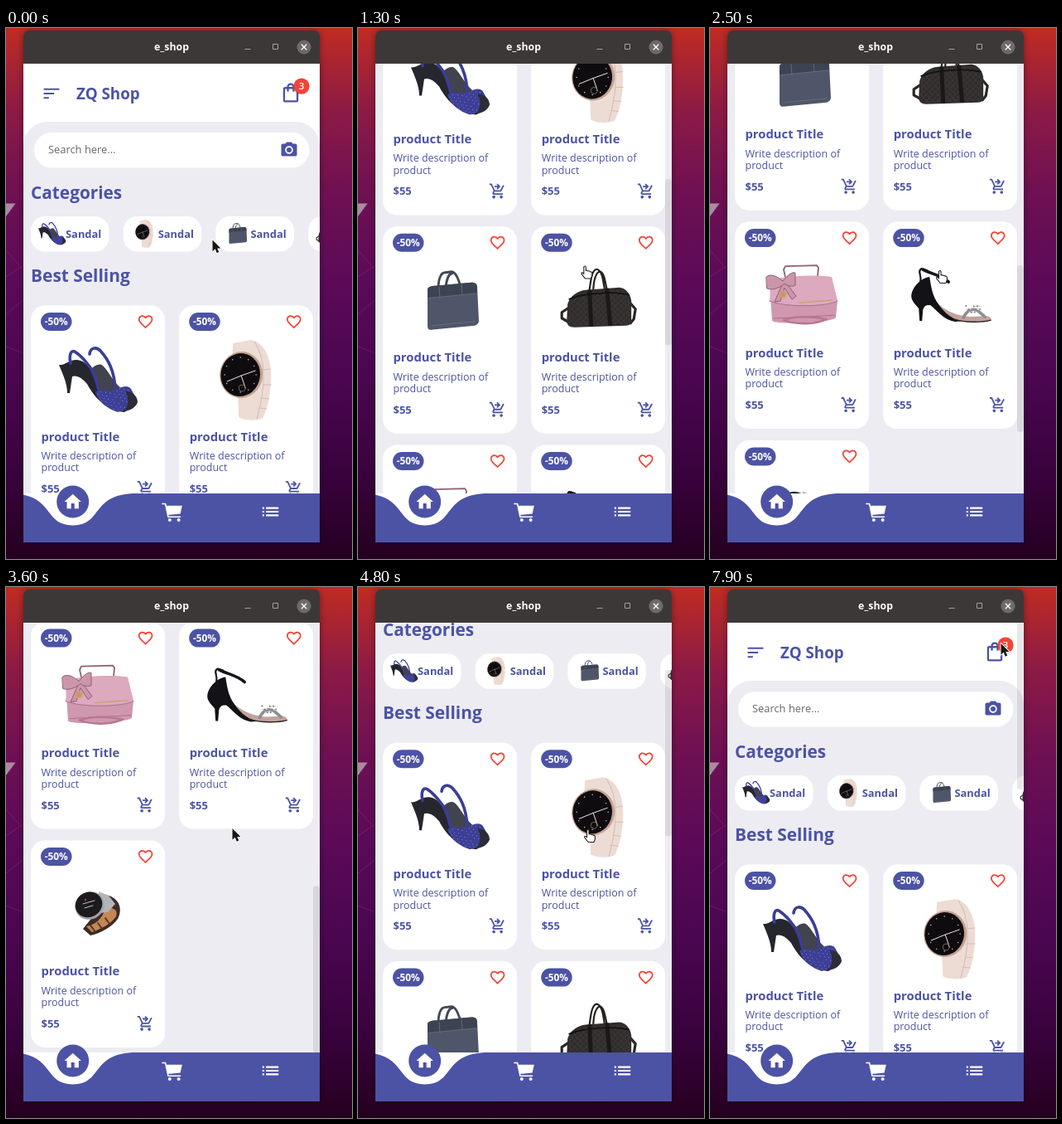
These frames come from a looping animation (418 px wide and 640 px high, 8000 ms). An HTML page with a canvas:

```html
<!DOCTYPE html>
<html lang="en">
<head>
<meta charset="utf-8">
<title>e_shop</title>
<style>
html, body { margin: 0; width: 418px; height: 640px; overflow: hidden; background: #3c0440; }
canvas { display: block; width: 418px; height: 640px; }
</style>
</head>
<body>
<canvas id="stage"></canvas>
<script>
const LOOP = 8000, W = 418, H = 640;
const BLUE = '#4c53a5', GREY = '#edecf2', RED = '#f44336';
const TICK = 44.82, MAX_SCROLL = 819, ROW = 263.3, COL = 179.2;
const VIEW = { x: 21, y: 43, w: 358, h: 518 };
const FONT = '"Ubuntu", "Open Sans", "Noto Sans", sans-serif';

const canvas = document.getElementById('stage');
const ratio = Math.max(1, window.devicePixelRatio || 1);
canvas.width = W * ratio;
canvas.height = H * ratio;
const ctx = canvas.getContext('2d');

const ICON = {
  sort: 'M3 18h6v-2H3v2zM3 6v2h18V6H3zm0 7h12v-2H3v2z',
  bag: 'M18 6h-2c0-2.21-1.79-4-4-4S8 3.79 8 6H6c-1.1 0-2 .9-2 2v12c0 1.1.9 2 2 2h12c1.1 0 2-.9 2-2V8c0-1.1-.9-2-2-2zm-6-2c1.1 0 2 .9 2 2h-4c0-1.1.9-2 2-2zm6 16H6V8h2v2c0 .55.45 1 1 1s1-.45 1-1V8h4v2c0 .55.45 1 1 1s1-.45 1-1V8h2v12z',
  camera: 'M9 2L7.17 4H4c-1.1 0-2 .9-2 2v12c0 1.1.9 2 2 2h16c1.1 0 2-.9 2-2V6c0-1.1-.9-2-2-2h-3.17L15 2H9zm3 15c-2.76 0-5-2.24-5-5s2.24-5 5-5 5 2.24 5 5-2.24 5-5 5zM12 8.8a3.2 3.2 0 1 0 0 6.4a3.2 3.2 0 1 0 0-6.4z',
  heart: 'M16.5 3c-1.74 0-3.41.81-4.5 2.09C10.91 3.81 9.24 3 7.5 3 4.42 3 2 5.42 2 8.5c0 3.78 3.4 6.86 8.55 11.54L12 21.35l1.45-1.32C18.6 15.36 22 12.28 22 8.5 22 5.42 19.58 3 16.5 3zm-4.4 15.55l-.1.1-.1-.1C7.14 14.24 4 11.39 4 8.5 4 6.5 5.5 5 7.5 5c1.54 0 3.04.99 3.57 2.36h1.87C13.46 5.99 14.96 5 16.5 5c2 0 3.5 1.5 3.5 3.5 0 2.89-3.14 5.74-7.9 10.05z',
  checkout: 'M7 18c-1.1 0-1.99.9-1.99 2S5.9 22 7 22s2-.9 2-2-.9-2-2-2zM17 18c-1.1 0-1.99.9-1.99 2s.89 2 1.99 2 2-.9 2-2-.9-2-2-2zM8.1 13h7.45c.75 0 1.41-.41 1.75-1.03L21 4.96 19.25 4l-3.7 7H8.53L4.27 2H1v2h2l3.6 7.59-1.35 2.44C4.52 15.37 5.48 17 7 17h12v-2H7l1.1-2zM12 2l4 4-4 4-1.41-1.41L12.17 7H8V5h4.17l-1.59-1.59L12 2z',
  home: 'M10 20v-6h4v6h5v-8h3L12 3 2 12h3v8z',
  list: 'M3 13h2v-2H3v2zm0 4h2v-2H3v2zm0-8h2V7H3v2zm4 4h14v-2H7v2zm0 4h14v-2H7v2zM7 7v2h14V7H7z'
};
for (const k in ICON) ICON[k] = new Path2D(ICON[k]);

function icon(name, cx, cy, scale, color) {
  ctx.save();
  ctx.translate(cx, cy);
  ctx.scale(scale, scale);
  ctx.translate(-12, -12);
  ctx.fillStyle = color;
  ctx.fill(ICON[name], 'evenodd');
  ctx.restore();
}

function box(x, y, w, h, r, color) {
  ctx.beginPath();
  ctx.roundRect(x, y, w, h, r);
  ctx.fillStyle = color;
  ctx.fill();
}

function disc(x, y, r, color, ry = r, turn = 0) {
  ctx.beginPath();
  ctx.ellipse(x, y, r, ry, turn, 0, Math.PI * 2);
  ctx.fillStyle = color;
  ctx.fill();
}

function text(str, x, y, size, color, weight = 700, align = 'left') {
  ctx.font = `${weight} ${size}px ${FONT}`;
  ctx.textAlign = align;
  ctx.fillStyle = color;
  ctx.fillText(str, x, y);
}

function shape(color, d) {
  ctx.fillStyle = color;
  ctx.fill(new Path2D(d));
}

function line(color, width, d) {
  ctx.strokeStyle = color;
  ctx.lineWidth = width;
  ctx.stroke(new Path2D(d));
}

// Product pictures, each drawn around its own centre
function sandal() {
  shape('#25262e', 'M-47 -20C-40 -19 -34 -27 -25 -26C-15 -25 -9 -16 -5 -8C4 8 20 22 46 28L32 37C12 35 -3 22 -13 3C-19 -4 -25 -8 -31 -6L-34 14L-37 14C-37 2 -43 -10 -47 -20Z');
  shape('#41434f', 'M-9 -14C-4 -20 2 -22 6 -19C14 -12 18 2 32 11L11 21C1 10 -5 -2 -9 -14Z');
  line('#3b3d96', 3.6, 'M-33 -22C-35 -31 -33 -38 -28 -36C-20 -31 -10 -20 -4 -8L2 14M-10 -33C-9 -41 -2 -42 3 -37C12 -27 20 -14 21 10');
  const vamp = new Path2D('M-3 13C8 7 14 14 22 10C30 6 36 4 40 9L45 18C46 25 42 31 37 33L24 37C12 33 2 26 -3 13Z');
  ctx.fillStyle = '#3d3f97';
  ctx.fill(vamp);
  ctx.save();
  ctx.clip(vamp);
  for (let i = 0; i < 70; i++) disc(-4 + (i * 7.3) % 49, 8 + (i * 4.7) % 29, 0.5, '#9da0d8');
  ctx.restore();
  shape('#2c2d36', 'M33 12C42 12 48 18 48 25C46 31 40 35 31 36C38 29 38 20 33 12Z');
}

function watch() {
  shape('#ecdcd4', 'M-17 -30L-16 -46L6 -50C22 -47 30 -28 30 -8C30 12 27 30 20 44C10 48 -3 47 -9 43L-10 16Z');
  line('#d3bdb5', 1.1, 'M10 -48C18 -36 21 -22 21 -6C21 14 17 30 13 45M21 -14L29 -15M21 4L30 4M18 20L27 21M15 32L24 33');
  disc(-6, -8, 26, '#c4a193', 28, 0.15);
  disc(-7, -8, 23.8, '#0e0c0f', 26, 0.15);
  for (let i = 0; i < 12; i++) {
    const a = i * Math.PI / 6;
    disc(-7 + 19 * Math.cos(a), -8 + 21 * Math.sin(a), 0.8, '#c9b8b0');
  }
  line('#eee6e2', 1, 'M-23 0L-6 -7L11 -13M-6 -7L-1 8');
  ctx.beginPath();
  ctx.arc(-5, 8, 4, 0, 7);
  ctx.strokeStyle = '#8f786e';
  ctx.lineWidth = 0.8;
  ctx.stroke();
}

function briefcase() {
  line('#414757', 2.8, 'M-14 -16C-14 -28 -11 -36 -6 -36L2 -37C8 -36 10 -28 14 -17M-5 -18C-4 -28 -1 -35 3 -35');
  shape('#50566a', 'M-27 -16C-26 -19 -22 -20 -18 -20L26 -24C31 -24 33 -22 33 -18L35 22C35 25 33 27 30 28L-23 33C-26 33 -27 31 -27 28Z');
  shape('#3d4353', 'M-27 -16C-26 -19 -22 -20 -18 -20L26 -24C31 -24 33 -22 33 -18L33 -11L-27 -5Z');
  line('#6a7184', 0.8, 'M-27 -5L33 -11M-22 28L30 23M-13 -18L-12 -5M14 -21L15 -9');
}

function duffel() {
  line('#252220', 2.2, 'M-11 -12C-9 -26 -8 -39 -2 -40C5 -39 6 -26 8 -14M-6 -12C-6 -28 -2 -38 3 -37C8 -34 8 -24 11 -14');
  line('#2b2726', 3.2, 'M-35 6L-44 12L-44 19L-37 23M38 0L45 8L43 20L39 25');
  shape('#302d2c', 'M-37 2C-34 -8 -25 -14 -15 -15L26 -18C34 -17 39 -10 40 -2L40 24C39 27 36 28 33 28L-29 30C-35 30 -38 27 -38 22Z');
  ctx.save();
  ctx.clip(new Path2D('M-36 0L-16 -12L30 -15L39 -2L38 27L-36 29Z'));
  for (let x = -70; x < 60; x += 7) line('#433e3b', 0.8, `M${x} -16l48 48M${x + 48} -16l-48 48`);
  ctx.restore();
  shape('#1b1918', 'M-13 -15L-8 -15L-6 29L-11 29ZM8 -17L13 -17L17 28L12 28Z');
  line('#151312', 1.8, 'M-35 -4C-18 -11 20 -14 37 -9');
}

function handbag() {
  line('#8f5f70', 1.8, 'M-20 -25L-22 -34L-20 -38L18 -39L20 -36L19 -26');
  shape('#cf98ae', 'M-39 -18C-20 -26 24 -27 36 -23L43 4L41 24C38 30 -30 33 -36 28Z');
  shape('#dca9be', 'M-37 -22C-15 -27 24 -28 36 -25L43 4C30 11 -20 12 -39 4Z');
  line('#ab728a', 1, 'M-39 4C-20 12 30 11 43 4M-34 25L40 21');
  line('#caa06c', 1.3, 'M-4 6L36 3');
  const bow = 'M-43 -25C-38 -30 -30 -26 -23 -20C-18 -27 -11 -32 -8 -30L-8 -15C-12 -13 -17 -14 -21 -17C-28 -11 -36 -9 -42 -11Z';
  const tails = 'M-23 -18L-33 5L-26 4L-21 -12L-12 2L-7 -2L-19 -18Z';
  [tails, bow].forEach(d => { shape('#cb96aa', d); line('#87566a', 0.9, d); });
  disc(-23, -4, 4.5, '#cf9f5e');
  disc(-23, -4, 2.6, '#c78f86');
  line('#b9768f', 2.6, 'M-22 27C-10 22 14 22 28 26M-22 27C-6 33 16 32 30 26');
}

function heel() {
  line('#16151a', 2.2, 'M-36 -20C-34 -26 -40 -32 -35 -35L-28 -33');
  line('#16151a', 3.6, 'M-33 -34C-24 -29 -10 -27 -2 -19');
  shape('#131217', 'M-47 -2C-46 -14 -34 -24 -25 -25C-23 -14 -22 -2 -14 8C-6 18 4 25 16 28L6 29C-8 27 -16 15 -24 9C-30 8 -32 11 -33 15L-34 28L-37 28L-38 13C-42 8 -47 4 -47 -2Z');
  shape('#c3a29c', 'M-14 8C-4 17 10 22 24 23L44 22C51 24 51 28 44 29L18 29C4 27 -6 20 -14 8Z');
  line('#26232a', 1.5, 'M4 26C18 30 38 30 49 27');
  line('#8d8d95', 3.6, 'M16 24C20 15 28 11 35 17L42 23');
  for (let i = 0; i < 14; i++) disc(19 + (i * 5.3) % 18, 10 + (i * 3.7) % 11, 1, i % 2 ? '#d5d5da' : '#77777f');
}

function sportWatch() {
  shape('#3a2c26', 'M4 -28L16 -24C28 -18 29 -6 24 3C18 12 4 20 -9 23L-18 15L-6 0Z');
  shape('#c48655', 'M9 -9C18 -12 25 -8 22 0C16 9 4 15 -7 19L-14 12C-2 10 5 2 9 -9Z');
  shape('#b4b5b9', 'M1 -30L13 -25L21 -15L12 -5L2 -4Z');
  line('#503524', 1.8, 'M-9 11L-3 19M0 8L5 15M9 2L14 9');
  disc(-10, -13, 18, '#a3a4a8', 16.5, -0.5);
  disc(-11, -14, 16.6, '#1b1a1d', 15, -0.5);
  line('#c2c2c8', 1, 'M-18 -15L-4 -19M-16 -10L-6 -13');
  disc(-15, -20, 1.2, '#b6483c');
}

const PRODUCTS = [sandal, watch, briefcase, duffel, handbag, heel, sportWatch];

function picture(draw, x, y, scale = 1) {
  ctx.save();
  ctx.translate(x, y);
  ctx.scale(scale, scale);
  ctx.lineCap = ctx.lineJoin = 'round';
  draw();
  ctx.restore();
}

function card(i) {
  ctx.save();
  ctx.translate((i % 2) * COL, Math.floor(i / 2) * ROW);
  box(30, 334.5, 162, 249.5, 17, '#fff');
  box(42, 343, 37.5, 22, 11, BLUE);
  text('-50%', 60.7, 358.3, 11.8, '#fff', 700, 'center');
  icon('heart', 168.6, 354, 0.875, RED);
  picture(PRODUCTS[i], 111, 426);
  text('product Title', 42.5, 497.5, 14.8, BLUE);
  text('Write description of', 42.5, 520, 12.5, BLUE, 400);
  text('product', 42.5, 534.3, 12.5, BLUE, 400);
  text('$55', 42.5, 560, 13, BLUE);
  icon('checkout', 168.6, 555, 0.9, BLUE);
  ctx.restore();
}

function header() {
  icon('sort', 55, 79, 1.05, BLUE);
  text('ZQ Shop', 85, 86, 18.8, BLUE);
  icon('bag', 344, 78, 1.15, BLUE);
  disc(357, 71, 9.8, 'rgba(0,0,0,.15)');
  disc(357, 70, 9.6, RED);
  text('3', 357, 74.3, 11.5, '#fff', 600, 'center');
}

function page(scroll) {
  ctx.save();
  ctx.beginPath();
  ctx.rect(VIEW.x, VIEW.y, VIEW.w, VIEW.h);
  ctx.clip();
  ctx.translate(0, -scroll);
  header();
  box(21, 113, 358, 1400, 29, GREY);
  box(34, 126, 332.5, 42.5, 21, '#fff');
  text('Search here...', 51, 151.3, 12.9, '#686868', 400);
  icon('camera', 342, 147, 0.95, BLUE);
  text('Categories', 30, 205.5, 20.8, BLUE);
  for (let i = 0; i < 4; i++) {
    const x = 30 + i * 111.7;
    box(x, 227, 94.5, 42.5, 17, '#fff');
    picture(PRODUCTS[i], x + 25.5, 248.5, 0.35);
    text('Sandal', x + 42, 253, 12.9, BLUE);
  }
  text('Best Selling', 30, 306, 20.9, BLUE);
  PRODUCTS.forEach((_, i) => card(i));
  ctx.restore();
}

function scrollbar(scroll, alpha) {
  const k = VIEW.h / (VIEW.h + MAX_SCROLL);
  box(371, VIEW.y + scroll * k, 7.5, VIEW.h * k, 3.5, `rgba(0,0,0,${0.09 * alpha})`);
}

function navBar() {
  const x = f => VIEW.x + f * VIEW.w, top = 561, h = 64, loc = 1 / 15, s = 0.2;
  ctx.save();
  ctx.beginPath();
  ctx.rect(21, top, 358, 59);
  ctx.clip();
  ctx.fillStyle = '#fff';
  ctx.fillRect(21, top, 358, 59);
  ctx.beginPath();
  ctx.moveTo(x(loc - 0.1), top);
  ctx.bezierCurveTo(x(loc + s * 0.2), top + h * 0.05, x(loc), top + h * 0.6, x(loc + s / 2), top + h * 0.6);
  ctx.bezierCurveTo(x(loc + s), top + h * 0.6, x(loc + s * 0.8), top + h * 0.05, x(loc + s + 0.1), top);
  ctx.lineTo(379, top);
  ctx.lineTo(379, 620);
  ctx.lineTo(0, 620);
  ctx.lineTo(0, top);
  ctx.fillStyle = BLUE;
  ctx.fill();
  ctx.restore();
  disc(80.7, 571, 19.5, BLUE);
  icon('home', 80.7, 571, 1.02, '#fff');
  ctx.lineCap = ctx.lineJoin = 'round';
  line('#fff', 1.6, 'M189 573.5h3.6L196 589.3h14.5');
  shape('#fff', 'M193 575.8H212.8L210.6 585.6L195.2 587Z');
  disc(197.8, 593, 2, '#fff');
  disc(208.6, 593, 2, '#fff');
  icon('list', 319.5, 583, 1.08, '#fff');
}

function desktop() {
  const g = ctx.createLinearGradient(0, 0, 0, H);
  [[0, '#c02c22'], [0.06, '#ab2530'], [0.16, '#8c1a46'], [0.3, '#701152'], [0.47, '#5c0a58'],
   [0.66, '#4b0650'], [0.85, '#38023c'], [1, '#250020']].forEach(([p, c]) => g.addColorStop(p, c));
  ctx.fillStyle = g;
  ctx.fillRect(0, 0, W, H);
  shape('#ab8ba4', 'M0 211.5H11.5L0 227Z');
  line('rgba(190,90,160,.22)', 1, 'M0 268L21 292M0 300L21 286M0 345L21 328M0 384L21 392');
}

function frame() {
  ctx.save();
  ctx.shadowColor = 'rgba(0,0,0,.4)';
  ctx.shadowBlur = 8 * ratio;
  box(21, 3, 358, 617, [7, 7, 0, 0], '#3b3837');
  ctx.restore();
  ctx.fillStyle = '#fff';
  ctx.fillRect(21, 43, 358, 577);
  text('e_shop', 200, 27, 12.3, '#fff', 700, 'center');
  ctx.lineCap = 'butt';
  line('#a5a3a1', 1, 'M288.5 25.5h7M322.5 19.5h6v6h-6z');
  disc(360, 23, 8.6, '#6d6a69');
  line('#fff', 1.3, 'M356.8 19.8l6.4 6.4M363.2 19.8l-6.4 6.4');
}

// Linear interpolation through [time, value] pairs
function track(t, keys) {
  for (let i = 1; i < keys.length; i++) {
    const [a, u] = keys[i - 1], [b, v] = keys[i];
    if (t < b) return u + (v - u) * Math.max(0, t - a) / (b - a);
  }
  return keys[keys.length - 1][1];
}

// The wheel moves the page in whole ticks
function scrollAt(t) {
  if (t < 3600) {
    const n = Math.floor(track(t, [[0, 0], [370, 4], [1950, 11], [3350, 19], [3600, 19]]));
    return Math.min(MAX_SCROLL, n * TICK);
  }
  const n = Math.floor(track(t, [[3600, 0], [4770, 15], [5100, 19]]));
  return Math.max(0, MAX_SCROLL - n * TICK);
}

function pointerAt(t) {
  const ease = p => p * p * (3 - 2 * p);
  const a = ease(track(t, [[1000, 0], [1400, 1]]));
  const b = ease(track(t, [[6300, 0], [7100, 1]]));
  return [249 + 24 * a + 78 * b, 255 + 35.5 * a - 223 * b];
}

function overPicture(x, y, scroll) {
  if (y < 43 || y > 561) return false;
  const cx = x > 200 ? x - COL : x, cy = y + scroll - 334.5;
  const row = Math.floor(cy / ROW), inRow = cy - row * ROW;
  const exists = row >= 0 && row * 2 + (x > 200 ? 1 : 0) < PRODUCTS.length;
  return exists && cx > 42 && cx < 180 && inRow > 38 && inRow < 145;
}

function pointer(x, y, hand) {
  ctx.save();
  ctx.translate(x, y);
  ctx.lineJoin = 'round';
  if (hand) {
    const d = 'M3.5 3.2C3.5 1.6 6 1.6 6 3.2V7.5C7.2 6.8 8.4 7.2 8.6 8C9.8 7.4 11 8 11.1 8.8C12.4 8.4 13.4 9 13.4 10.4V13L12 17H5.2L0.8 11.6C0 10.2 1.4 9.2 2.4 10.2L3.5 11.3Z';
    shape('#fff', d);
    line('#222', 1.1, d);
  } else {
    const d = 'M0.5 0.5V14.2L3.7 11.3L5.8 16.2L8.3 15.1L6.2 10.4H10.4Z';
    line('#fff', 1.8, d);
    shape('#161616', d);
  }
  ctx.restore();
}

function draw(t) {
  ctx.setTransform(ratio, 0, 0, ratio, 0, 0);
  const scroll = scrollAt(t), [x, y] = pointerAt(t);
  desktop();
  frame();
  page(scroll);
  scrollbar(scroll, track(t, [[60, 0], [300, 1]]));
  navBar();
  pointer(x, y, overPicture(x, y, scroll));
}

const start = performance.now();
function tick(now) {
  draw(Math.max(0, now - start) % LOOP);
  requestAnimationFrame(tick);
}
draw(0);
requestAnimationFrame(tick);
</script>
</body>
</html>
```
